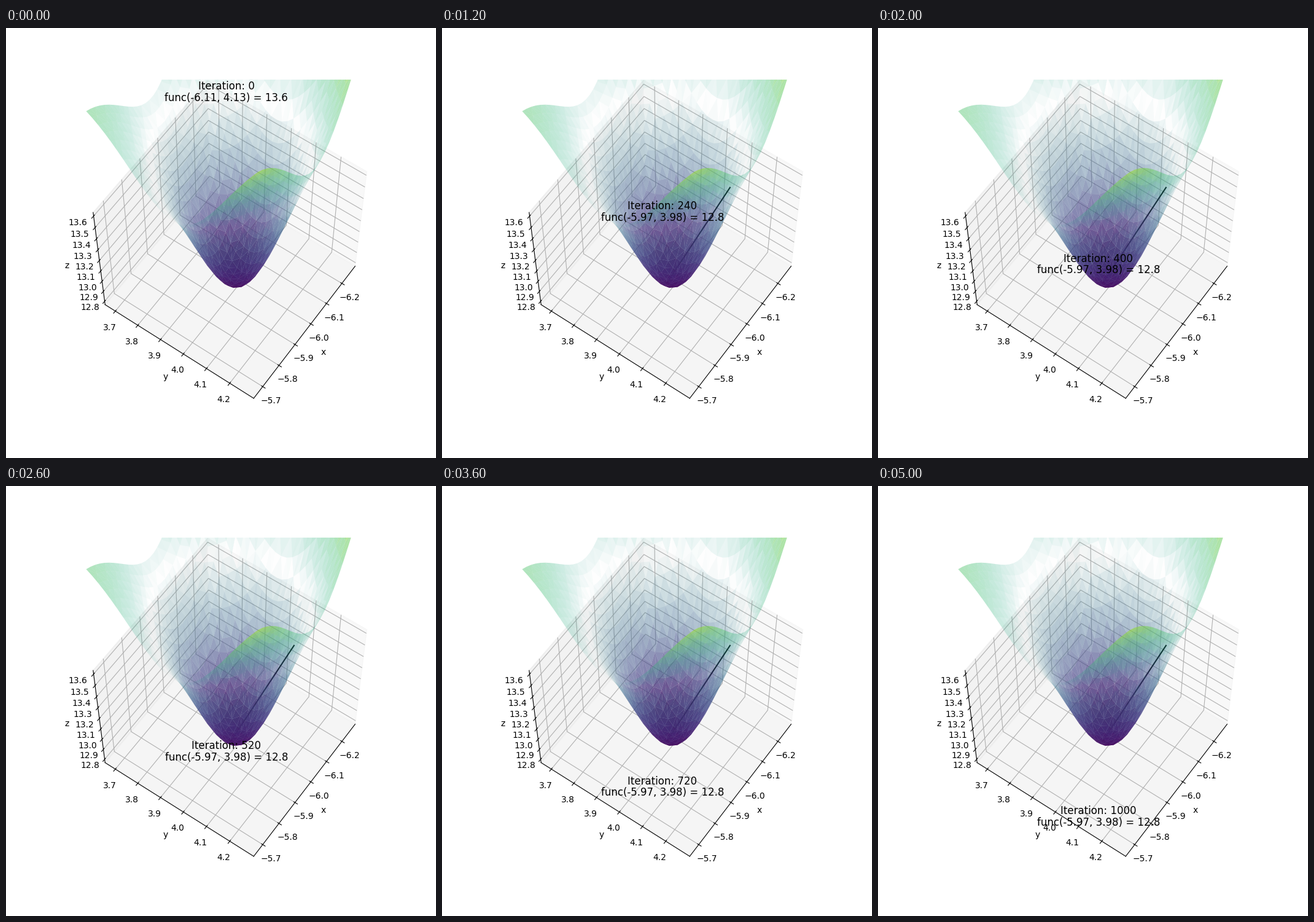
A matplotlib script that plays this animation: 700 by 700 pixels, repeating every 5.2 s.

```python
import numpy as np
import matplotlib.pyplot as plt
from matplotlib.animation import FuncAnimation
from matplotlib.colors import ListedColormap

FRAMES, INTERVAL, STEP = 26, 200, 40
START = (-6.108, 4.133)
END = (-5.966, 3.978)
HALF = (0.308, 0.311)
Z_RANGE = (12.783, 13.614)
GRID = 30


def ackley(x, y):
    bowl = -20 * np.exp(-0.2 * np.sqrt(0.5 * (x**2 + y**2)))
    waves = -np.exp(0.5 * (np.cos(2 * np.pi * x) + np.cos(2 * np.pi * y)))
    return bowl + waves + np.e + 20


def fading_viridis():
    # opaque at both ends, clear in the middle
    colors = plt.get_cmap("viridis")(np.arange(256))
    colors[:, 3] = np.abs(np.linspace(-1, 1, 256))
    return ListedColormap(colors)


def setup_axis(axis, set_lim, name, lo, hi):
    # panes reach a little past the data, ticks do not
    pad = (hi - lo) / 48
    axis.set_ticks(np.arange(np.ceil(lo * 10), np.floor(hi * 10) + 1) / 10)
    axis.set_label_text(name)
    set_lim(lo - pad, hi + pad)


fig = plt.figure(figsize=(7, 7), dpi=100)
ax = fig.add_subplot(projection="3d")
ax.view_init(elev=60, azim=35)
# unit cube that fills the whole subplot rectangle
ax.set_box_aspect((1, 1, 1), zoom=np.sqrt(3) / 1.8294640721620434)
ax.apply_aspect = lambda position=None: None
ax.title.set_linespacing(1.04)

x_range, y_range = [(c - h, c + h) for c, h in zip(END, HALF)]
X, Y = np.meshgrid(np.linspace(*x_range, GRID), np.linspace(*y_range, GRID))
ax.plot_trisurf(X.ravel(), Y.ravel(), ackley(X, Y).ravel(),
                cmap=fading_viridis(), linewidth=0, antialiased=True)

path = np.array([(x, y, ackley(x, y)) for x, y in (START, END)])
line, = ax.plot([], [], [], color="black", linewidth=1.5)

setup_axis(ax.xaxis, ax.set_xlim, "x", *x_range)
setup_axis(ax.yaxis, ax.set_ylim, "y", *y_range)
setup_axis(ax.zaxis, ax.set_zlim, "z", *Z_RANGE)


def update(i):
    done = path[:1] if i == 0 else path
    line.set_data_3d(*done.T)
    x, y, z = done[-1]
    ax.set_title(f"Iteration: {i * STEP}\nfunc({x:.2f}, {y:.2f}) = {z:.1f}")
    ax.title.set_y(0.92 ** (i + 1))
    return line, ax.title


ax.set_title("", y=1)  # fixed placement, no automatic shift
anim = FuncAnimation(fig, update, frames=FRAMES, interval=INTERVAL,
                     repeat=True, repeat_delay=0, blit=False)
plt.show()
```
